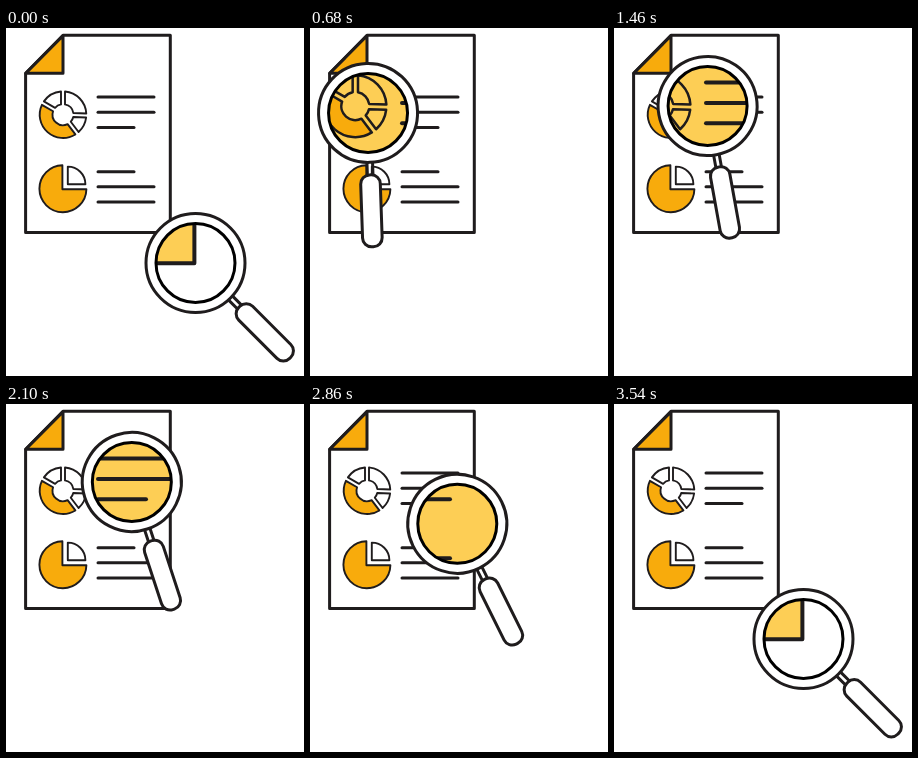
Recreate the animation shown at these times as an HTML page. Size 298 by 348 pixels, loop 3730 ms.

```html
<!DOCTYPE html>
<html lang="en">
<head>
<meta charset="utf-8">
<title>Report under a magnifier</title>
<style>
  html, body { margin: 0; width: 100%; height: 100%; overflow: hidden; background: #fff; }
  svg { display: block; width: 298px; height: 348px; }
  .ink { stroke: #1f1c1d; stroke-width: 3; stroke-linejoin: round; stroke-linecap: round; }
  .thin { stroke-width: 1.9; }
</style>
</head>
<body>
<svg viewBox="0 0 298 348" fill="#fff">
  <defs>
    <clipPath id="glass"><circle id="hole" r="39.5"/></clipPath>
  </defs>
  <g id="page" class="ink"></g>
  <g id="lens">
    <path class="ink" stroke-width="2" d="M-2.8 49V63M2.8 49V63"/>
    <rect class="ink" x="-9.8" y="62" width="19.6" height="72" rx="9"/>
    <circle class="ink" r="49.5"/>
  </g>
  <g clip-path="url(#glass)">
    <g id="zoom" class="ink" transform="matrix(1.3333 0 0 1.3333 -30.67 -37.5)"></g>
  </g>
  <circle id="rim" r="39.5" fill="none" stroke="#000" stroke-width="3"/>
</svg>
<script>
const ORANGE = '#f8ab0c', YELLOW = '#fdce55';
const $ = id => document.getElementById(id);

// Ring slice between two rays, inset so that the gaps have parallel sides
function slice(from, to, fill) {
  const R = 23.3, r = 10.5, gap = 2;
  const at = (deg, rad, side) => {
    const a = deg * Math.PI / 180 + side * Math.asin(gap / rad);
    return (57 + rad * Math.sin(a)).toFixed(2) + ' ' + (86.7 - rad * Math.cos(a)).toFixed(2);
  };
  const big = to - from > 180 ? 1 : 0;
  return `<path class="thin" fill="${fill}" d="M${at(from, R, 1)}A${R} ${R} 0 ${big} 1 ${at(to, R, -1)}` +
    `L${at(to, r, -1)}A${r} ${r} 0 ${big} 0 ${at(from, r, 1)}Z"/>`;
}

function report(paper) {
  const rows = [[69, 148], [84.3, 148], [99.5, 128], [143.8, 128], [158.8, 148], [174, 148]];
  return `<path fill="${paper}" d="M57 7.3H164.3V204.5H19.6V45.3Z"/>` +
    `<path fill="${ORANGE}" d="M57 7.8V45.3H19.8Z"/>` +
    slice(0, 92, paper) + slice(92, 143, paper) +
    slice(143, 300, ORANGE) + slice(300, 360, paper) +
    rows.map(([y, x]) => `<path d="M92 ${y}H${x}"/>`).join('');
}

const pie = `<path class="thin" fill="${ORANGE}" d="M56.4 137.2V161.2H80.4A23.5 23.5 0 1 1 56.4 137.2Z"/>` +
  '<path class="thin" d="M61.8 138.6A17.6 17.6 0 0 1 79.4 156.2H61.8Z"/>';

$('page').innerHTML = report('#fff') + pie;
$('zoom').innerHTML = report(YELLOW);

// cubic-bezier(.25, .1, .25, 1)
function ease(x) {
  if (x <= 0) return 0;
  if (x >= 1) return 1;
  const curve = (u, p, q) => 3 * (1 - u) * (1 - u) * u * p + 3 * (1 - u) * u * u * q + u * u * u;
  let lo = 0, hi = 1;
  for (let i = 0; i < 24; i++) {
    const mid = (lo + hi) / 2;
    if (curve(mid, .25, .25) < x) lo = mid; else hi = mid;
  }
  return curve(lo, .1, 1);
}

const LOOP = 3730, STEP = 20;
// time, lens x, lens y, handle angle
const keys = [
  [5, 189.5, 235, 45],
  [920, 52, 78, 0],
  [2700, 132, 78, 19.7],
  [3555, 189.5, 235, 45]
];

function draw(ms) {
  const t = Math.floor(ms / STEP) * STEP;
  let i = 0;
  while (i < keys.length - 2 && t >= keys[i + 1][0]) i++;
  const a = keys[i], b = keys[i + 1];
  const k = ease((t - a[0]) / (b[0] - a[0]));
  const [x, y, turn] = [1, 2, 3].map(n => a[n] + (b[n] - a[n]) * k);
  $('lens').setAttribute('transform', `translate(${x} ${y}) rotate(${-turn})`);
  for (const id of ['hole', 'rim']) {
    $(id).setAttribute('cx', x);
    $(id).setAttribute('cy', y);
  }
}

const start = performance.now();
function tick() {
  draw((performance.now() - start) % LOOP);
  requestAnimationFrame(tick);
}
tick();
</script>
</body>
</html>
```
